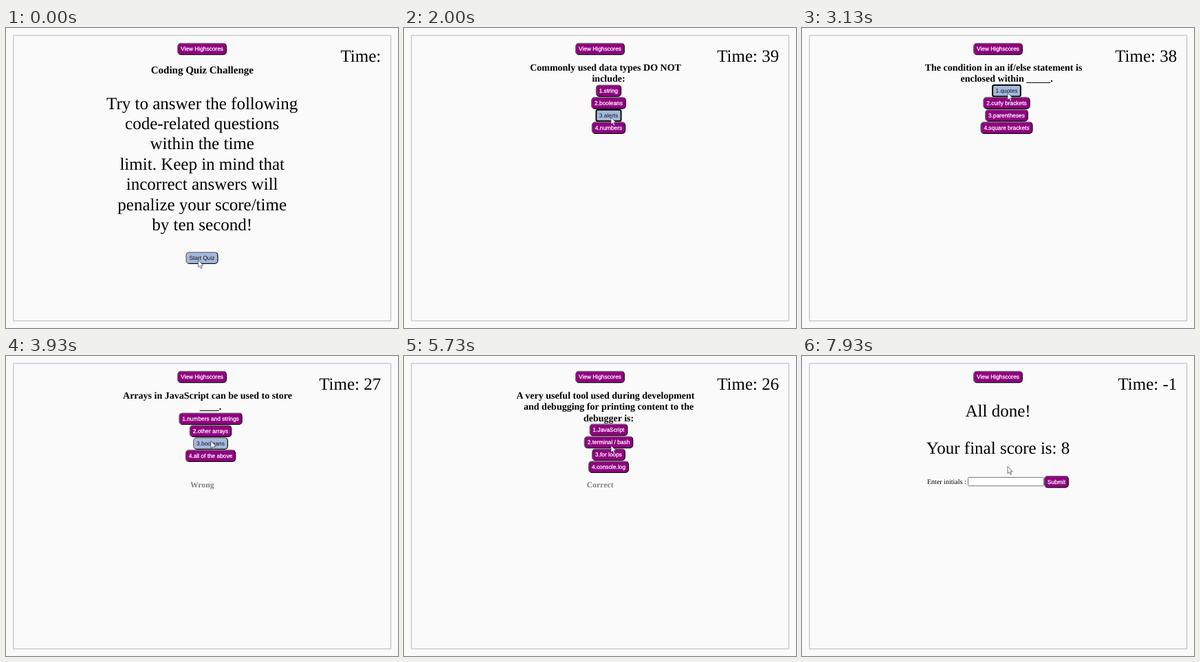
Animation, 570 px wide and 436 px high, one loop 8000 ms. Source, as an HTML page:

```html
<!DOCTYPE html>
<html lang="en">
<head>
<meta charset="utf-8">
<title>Coding Quiz</title>
<style>
  html, body { margin: 0; width: 100%; height: 100%; overflow: hidden; background: #fafafa; }
  svg { display: block; }
  text { font-family: "Liberation Serif", serif; text-anchor: middle; white-space: pre; text-rendering: geometricPrecision; }
  .big { font-size: 25px; }
  .title { font-size: 15px; font-weight: bold; }
  .question { font-size: 14px; font-weight: bold; }
  .feedback { font-size: 11.7px; font-weight: bold; fill: #808080; }
  .label { font-size: 10px; text-anchor: start; }
  .time { font-size: 25px; text-anchor: end; }
  .button rect { fill: #900080; stroke: url(#bevel); stroke-width: 1.25; }
  .button text { font: 8.333px "Liberation Sans", sans-serif; fill: #fff; stroke: #fff; stroke-width: .25; }
  .button.hover rect { fill: #a5b9dc; }
  .button.hover text { fill: #111; stroke: none; }
  .button.focus rect { stroke: #0a0a0a; stroke-width: 2; }
</style>
</head>
<body>
<svg id="stage" width="570" height="436" viewBox="0 0 570 436">
  <defs>
    <linearGradient id="bevel" x1="0" y1="0" x2="1" y2="1">
      <stop offset=".5" stop-color="#6f6470"/>
      <stop offset=".5" stop-color="#111"/>
    </linearGradient>
  </defs>
  <rect width="570" height="436" fill="#fafafa"/>
  <rect x="10.8" y="10.8" width="548.8" height="414.8" fill="none" stroke="#c6c6c6" stroke-width="1.3"/>
</svg>
<script>
const LOOP = 8000;
const FEEDBACK_TIME = 850;
const HOVER_DELAY = 160;
const stage = document.getElementById('stage');

function add(parent, tag, attrs, content = '') {
  const node = document.createElementNS('http://www.w3.org/2000/svg', tag);
  for (const name in attrs) node.setAttribute(name, attrs[name]);
  node.textContent = content;
  return parent.appendChild(node);
}

const addText = (parent, cls, x, y, content) => add(parent, 'text', { class: cls, x, y }, content);

function addButton(parent, cx, cy, label) {
  const group = add(parent, 'g', { class: 'button' });
  const box = add(group, 'rect', { y: cy - 8.2, height: 16.4, rx: 4.4 });
  const width = add(group, 'text', { x: cx, y: cy + 2.9 }, label).getComputedTextLength() + 10;
  box.setAttribute('x', cx - width / 2 + .6);
  box.setAttribute('width', width - 1.2);
  const contains = (x, y) => Math.abs(x - cx) < width / 2 && Math.abs(y - cy) < 8.8;
  return { group, box, contains };
}

// start: when the screen appears; press: mouse down on its chosen button
function addScreen(start, press, feedback, build) {
  const group = add(stage, 'g', {});
  return { start, press, feedback, group, buttons: build(group) };
}

function addQuestion(start, press, feedback, lines, answers) {
  return addScreen(start, press, feedback, group => {
    lines.forEach((line, i) => addText(group, 'question', i ? 297.6 : 293, 62 + 16.3 * i, line));
    const top = 91.2 + 16.2 * (lines.length - 2);
    return answers.map((answer, i) => addButton(group, 297.5, top + 17.95 * i, `${i + 1}.${answer}`));
  });
}

addButton(stage, 285, 30.5, 'View Highscores');
const timeText = addText(stage, 'time', 545.3, 48.7, '');

const screens = [
  addScreen(0, 600, '', group => {
    addText(group, 'title', 285.3, 65.5, 'Coding Quiz Challenge');
    ['Try to answer the following', 'code-related questions', 'within the time',
      'limit. Keep in mind that', 'incorrect answers will', 'penalize your score/time',
      'by ten second!'
    ].forEach((line, i) => addText(group, 'big', 285.2, 117.5 + 29.4 * i, line));
    return [addButton(group, 285, 334.2, 'Start Quiz')];
  }),
  addQuestion(730, 1960, '', ['Commonly used data types DO NOT', 'include:'],
    ['string', 'booleans', 'alerts', 'numbers']),
  addQuestion(2060, 3100, 'Correct', ['The condition in an if/else statement is', 'enclosed within _____.'],
    ['quotes', 'curly brackets', 'parentheses', 'square brackets']),
  addQuestion(3200, 4400, 'Wrong', ['Arrays in JavaScript can be used to store', '____.'],
    ['numbers and strings', 'other arrays', 'booleans', 'all of the above']),
  addQuestion(4460, 5600, 'Correct', ['String values must be enclosed within ____', 'when being assigned to variables.'],
    ['commas', 'curly brackets', 'quotes', 'parentheses']),
  addQuestion(5660, 6770, 'Correct',
    ['A very useful tool used during development', 'and debugging for printing content to the', 'debugger is:'],
    ['JavaScript', 'terminal / bash', 'for loops', 'console.log']),
  addScreen(6870, LOOP, '', group => {
    addText(group, 'big', 285, 88, 'All done!');
    addText(group, 'big', 285, 142.3, 'Your final score is: 8');
    addText(group, 'label', 182, 185.6, 'Enter initials :');
    add(group, 'rect', { x: 241.5, y: 176.4, width: 110, height: 12.4, rx: 1.2, fill: '#fff', stroke: '#777' });
    return [addButton(group, 370, 182.8, 'Submit')];
  })
];

const feedbackText = addText(stage, 'feedback', 285.2, 191.3, '');
const cursor = add(stage, 'path', {
  d: 'M0 0V10.2L2.4 8.1L4.1 11.9L5.7 11.2L4.1 7.5H7.2Z',
  fill: '#fff', stroke: '#333a50', 'stroke-width': .7, 'stroke-linejoin': 'round'
});

// [time, displayed seconds]
const ticks = [[0, ''], [1730, 39], [2730, 38], [3730, 27], [4730, 26], [5800, 25], [6770, 24], [7730, -1]];

// [move start, move end, x, y]
const moves = [
  [0, 0, 279.5, 337.5],
  [1100, 1930, 301, 130],
  [2430, 3060, 299, 94.3],
  [3570, 4260, 297, 149.3],
  [4900, 5330, 301, 130],
  [6100, 6700, 299, 160.5]
];

const lastBefore = (list, t, timeOf) => list.filter(item => timeOf(item) <= t).pop();

function cursorAt(t) {
  let [x, y] = moves[0].slice(2);
  for (const [from, to, nextX, nextY] of moves.slice(1)) {
    const p = Math.min(1, Math.max(0, (t - from) / (to - from)));
    const eased = p * p * (3 - 2 * p);
    x += (nextX - x) * eased;
    y += (nextY - y) * eased;
  }
  return [x, y];
}

function render(t) {
  const screen = lastBefore(screens, t, s => s.start);
  const [x, y] = cursorAt(t);
  const age = t - screen.start;
  for (const s of screens) s.group.setAttribute('display', s === screen ? 'inline' : 'none');

  for (const { group, box, contains } of screen.buttons) {
    const hover = contains(x, y) && (screen.start === 0 || age >= HOVER_DELAY);
    const focus = hover && t >= screen.press;
    group.classList.toggle('hover', hover);
    group.classList.toggle('focus', focus);
    box.setAttribute('rx', focus ? 2.4 : 4.4);
  }

  timeText.textContent = `Time: ${lastBefore(ticks, t, tick => tick[0])[1]}`.trim();
  feedbackText.textContent = age < FEEDBACK_TIME ? screen.feedback : '';
  cursor.setAttribute('transform', `translate(${x} ${y})`);
}

const began = performance.now();
function frame() {
  render((performance.now() - began) % LOOP);
  requestAnimationFrame(frame);
}
frame();
</script>
</body>
</html>
```
